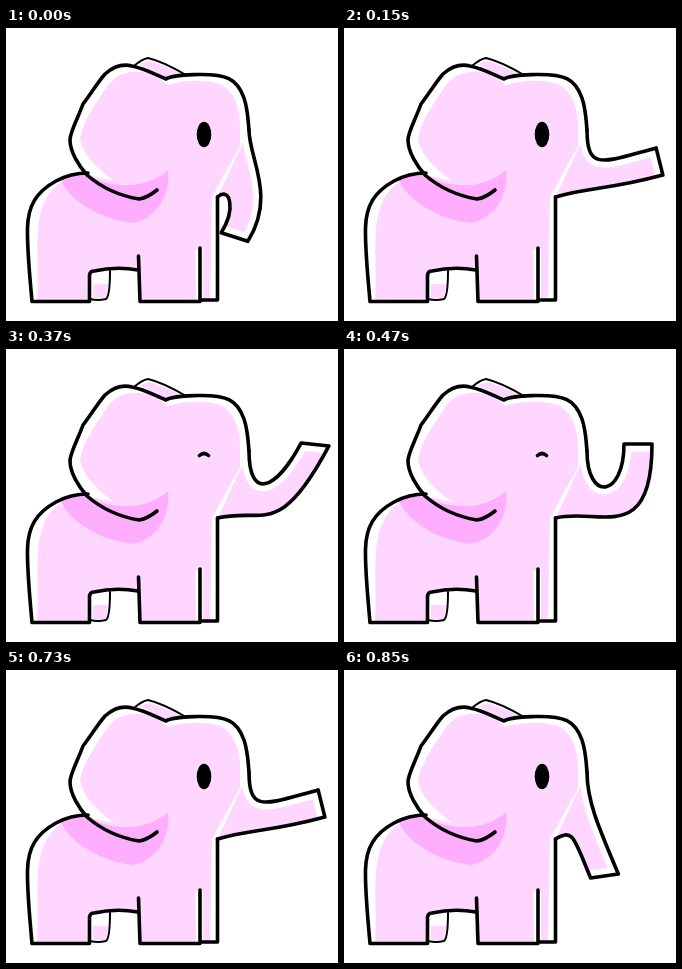
Write an HTML page that moves like this. It is 332x293 px and loops after 0.88 s.

```html
<!DOCTYPE html>
<html lang="en">
<head>
<meta charset="utf-8">
<title>Elephant</title>
<style>
  html, body { margin: 0; width: 100%; height: 100%; overflow: hidden; background: #fff; }
  svg { display: block; width: 100vw; height: 100vh; }
  .line { fill: none; stroke: #000; stroke-width: 3.6; stroke-linecap: round; stroke-linejoin: round; }
  .thin { stroke-width: 2; }
  .gap { fill: none; stroke: #fff; stroke-width: 15; stroke-linejoin: round; }
  .skin { fill: #ffd6ff; }
  .shade { fill: #ffadff; }
</style>
</head>
<body>
<svg viewBox="0 0 332 293">
  <!-- far ear and far hind leg -->
  <path class="skin" d="M133 36L144 33C156 37 168 42 177 47L161 50Z"/>
  <path class="line thin" d="M128 38Q136 31 142 30C155 33 168 40 180 47"/>
  <path class="skin" d="M87 256H102L100 270H87Z"/>
  <path class="line thin" d="M84 271Q92 273 100 271Q104 268 104 243"/>

  <path class="skin" id="trunk"/>
  <path class="gap" id="trunkGap"/>

  <path class="skin" d="M58 152C40 163 34 180 32 202C30 225 33 250 31 273H83V246Q84 243 88 243
    Q110 238 133 242L135 273H190L189 222L197 220V271H204L206 169L234 118V95
    C233 78 228 63 214 56C198 51 178 52 161 57C150 46 140 43 126 44
    C114 45 108 50 102 57L90 75C84 85 76 97 74 111C77 126 88 138 108 153L82 147Z"/>
  <path class="shade" d="M55 152Q65 147 82 147C105 161 140 162 162 142
    C165 165 152 191 126 195C96 191 64 174 55 152Z"/>

  <path class="line" d="M82 145C70 145 61 147 50 153C30 164 22 178 21.5 200C21 222 24 250 26 273.5H83.5V247Q84 243 88 243Q110 238 132 242"/>
  <path class="line" d="M132.5 228L134 273.5H194V220M194 272H211.5V169"/>
  <path class="line" d="M151 162Q141 170 133 171C115 168 96 160 81 147C73 138 64 124 64 112
    C64 104 72 90 77 76C84 67 92 54 99 46C108 38 118 36 126 38C140 41 148 46 160 51
    C166 47 180 47 192 46.5C220 46 231 50 238 70C242 82 242 92 243 102"/>
  <path class="line" id="trunkLine"/>

  <ellipse id="open" cx="198" cy="106.5" rx="7.3" ry="12.8"/>
  <path class="line" id="shut" d="M193 107H203"/>
  <path class="line" id="happy" d="M193.5 106.5Q198 102.5 202.5 106.5"/>
</svg>
<script>
const $ = id => document.getElementById(id);
const chest = [211.5, 169], brow = [243, 102], TIP = 28;

// Trunk tip: centre x, y, angle of the cut edge, angle the trunk points at (degrees)
const down = [228.5, 209, 18, 122];
const low  = [260.5, 206, -8, 67];
const out  = [306, 176, -58, 27];
const flat = [315.5, 133.5, -104, -15];
const up   = [294, 95, -180, -90];
const curl = [279, 95.5, -181, -115];
const wave = [309, 95.5, -174, -62];

const mid = (a, b) => a.map((v, i) => (v + b[i]) / 2);
const rise = [[down], [low], [mid(low, out)], [out], [mid(out, flat)], [flat],
              [mid(flat, up), 'half'], [up, 'shut'], [curl, 'happy']];
const steps = [...rise, [up, 'happy'], [wave, 'happy'], [up, 'happy'], ...rise.slice(1).reverse()];

// Most poses last 30 ms; the ones around the wave are held
const LOOP = 880, held = new Set([8, 10, 12, 13]);
let end = 0;
const ends = steps.map((_, i) => end += held.has(i) ? 100 : 30);

// Point at a distance and angle from p
const polar = ([x, y], r, deg) => {
  const a = deg * Math.PI / 180;
  return [x + r * Math.cos(a), y + r * Math.sin(a)];
};

// Each side is one curve that leaves the head and arrives along the pointing angle
function draw([[x, y, edge, aim], eye = 'open']) {
  const lower = polar([x, y], -TIP / 2, edge), upper = polar([x, y], TIP / 2, edge);
  const sin = Math.sin(aim * Math.PI / 180);
  const span = Math.hypot(lower[0] - chest[0], lower[1] - chest[1]);

  const under = `C${chest[0] + span * .35},${chest[1] - 11} `
    + `${polar(lower, -span * (.45 + .4 * Math.abs(sin)), aim)} ${lower}`;
  const top = `L${upper}C${polar(upper, -54, aim)} ${brow[0]},${brow[1] + 39 - 12 * sin} ${brow}`;

  $('trunk').setAttribute('d', `M${chest}${under}${top}Z`);
  $('trunkLine').setAttribute('d', `M${chest}${under}${top}`);
  $('trunkGap').setAttribute('d', `M${lower}${top}`);

  const lid = { open: 1, half: .5 }[eye];
  $('open').style.display = lid ? '' : 'none';
  $('open').setAttribute('ry', 12.8 * (lid || 0));
  for (const id of ['shut', 'happy']) $(id).style.display = eye === id ? '' : 'none';
}

let shown = -1;
function tick() {
  const t = performance.now() % LOOP;
  const i = ends.findIndex(e => t < e);
  if (i !== shown) draw(steps[shown = i]);
  requestAnimationFrame(tick);
}
tick();
</script>
</body>
</html>
```
